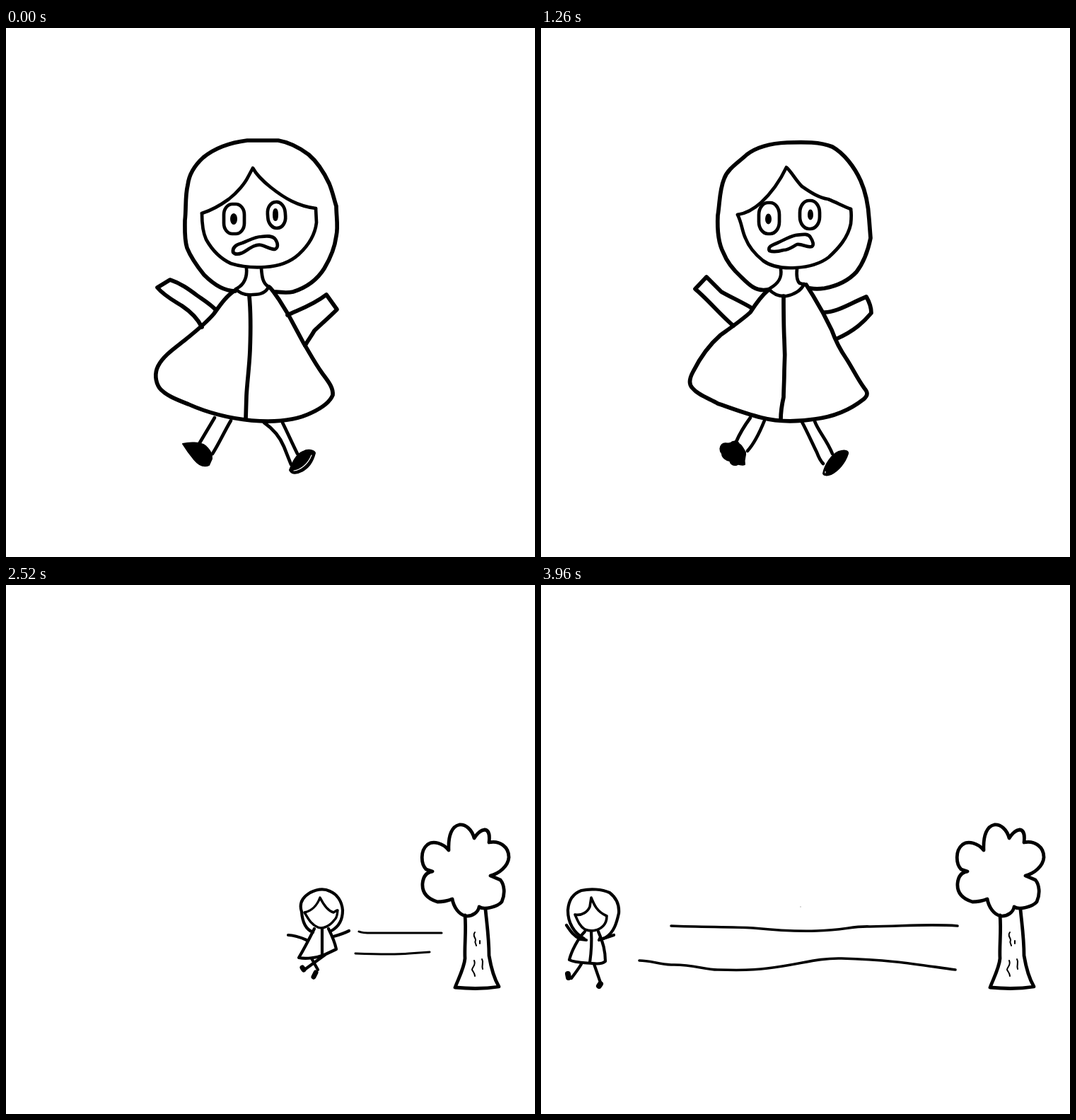
An HTML page without scripts for the animation above (4140 ms loop, 748 by 748 pixels).

```html
<!DOCTYPE html>
<html lang="en">
<head>
<meta charset="utf-8">
<title>Running from the tree</title>
<style>
  html, body { margin: 0; width: 100%; height: 100%; overflow: hidden; background: #fff; }
  svg { display: block; width: 100vw; height: 100vh; }
  svg { fill: none; stroke: #000; stroke-linecap: round; stroke-linejoin: round; }
  .big { stroke-width: 5.7; }
  .mid { stroke-width: 4.7; }
  .small { stroke-width: 4.2; }
  .trail { stroke-width: 3.6; }
  .thin { stroke-width: 2; }
  .ink { fill: #000; stroke-width: 2; }
  .shoe { stroke-width: 8; }
  .gap { stroke: #fff; stroke-width: 1.2; }

  /* 23 beats of 180 ms; --s is the beat on which a drawing appears */
  .on { opacity: 0; animation: one 4140ms step-end infinite; animation-delay: calc((var(--s) - 23) * 180ms); }
  .two { animation-name: two; }
  .three { animation-name: three; }
  .rest { animation-name: rest; }
  @keyframes one { 0% { opacity: 1 } 4.3478%, 100% { opacity: 0 } }
  @keyframes two { 0% { opacity: 1 } 8.6956%, 100% { opacity: 0 } }
  @keyframes three { 0% { opacity: 1 } 13.0434%, 100% { opacity: 0 } }
  @keyframes rest { 0% { opacity: 1 } 47.826%, 100% { opacity: 0 } }
</style>
</head>
<body>
<svg viewBox="0 0 748 748">
  <defs>
    <g id="headA">
      <path class="big" d="M324 372C308 372 292 361 280 349C272 339 262 326 256 311C252 298 253 285 253 272C255 255 253 238 257 222C259 205 268 193 279 183C295 170 317 162 341 159H385C403 162 416 170 428 179C442 191 450 205 457 220C462 232 464 243 467 252C467 266 470 281 467 294C465 310 459 325 450 340C440 356 425 367 406 373C398 375 390 374 380 373"/>
      <g class="mid">
        <path d="M277 262C290 258 304 250 315 242C328 232 338 219 342 211L349 198C355 209 364 217 374 225C394 241 413 252 438 255"/>
        <path d="M277 262C277 275 278 288 283 299C292 315 303 326 318 333C334 338 350 339 366 338C385 337 401 332 414 320C427 308 437 293 439 275L438 255"/>
        <rect x="308" y="249" width="29" height="42" rx="12" ry="15"/>
        <rect x="370" y="246" width="25" height="37" rx="12" ry="16" transform="rotate(-4 382 264)"/>
        <path d="M321 317C320 310 326 306 334 304C344 300 352 295 361 295C368 294 377 293 381 299C385 305 385 311 380 313C374 313 368 309 361 307C351 305 342 314 334 318C329 320 324 321 321 317Z"/>
      </g>
      <ellipse class="ink" cx="322" cy="270" rx="4" ry="7"/>
      <ellipse class="ink" cx="381" cy="264" rx="3" ry="8"/>
    </g>

    <g id="bodyA">
      <g class="mid">
        <path d="M340 339C341 350 339 361 327 368M361 340C362 352 363 360 370 365"/>
        <path d="M325 369C332 377 340 378 349 377C360 377 368 374 371 366"/>
        <path d="M295 551L273 588M318 555C308 572 301 588 292 602M365 558C378 567 388 580 393 592C397 602 400 610 403 617M391 558C398 572 404 586 412 602"/>
      </g>
      <g class="big">
        <path d="M324 371C312 378 302 393 294 404C284 416 267 430 252 442C238 453 222 464 215 478C210 488 211 500 217 509C225 519 240 525 258 532C285 544 317 552 347 555C382 558 412 554 432 544C445 538 458 529 462 519C463 508 455 499 447 488C435 471 428 457 421 446C414 433 405 416 399 405L386 384C381 377 376 369 372 366"/>
        <path d="M344 379C346 400 346 430 345 456C344 480 341 500 340 520L339 553"/>
        <path d="M297 399C290 391 280 385 270 378C258 369 247 361 232 356L214 367C224 379 238 386 249 393C261 401 271 411 277 423"/>
        <path d="M398 406C412 399 434 392 453 377L468 398C455 411 444 420 436 428C431 437 427 441 423 449"/>
      </g>
      <path class="ink" d="M250 588C258 586 275 585 282 591C288 597 292 602 291 609L287 618C278 622 271 616 266 610C260 603 255 596 250 588Z"/>
      <path class="ink" d="M401 625C405 615 410 603 420 599C427 595 436 597 437 601C434 613 428 622 418 627C411 631 403 631 401 625Z"/>
      <path class="gap" d="M407 626C416 625 427 617 432 604"/>
    </g>

    <g id="headB">
      <path class="big" d="M320 370C304 373 294 363 283 352C271 341 263 331 258 318C250 303 249 285 250 265C253 247 252 230 259 213C264 199 278 191 291 179C304 169 325 163 348 162C372 161 395 161 412 168C428 177 443 196 452 216C460 234 463 253 464 271L466 297C462 317 456 332 446 345C433 359 417 365 401 368C394 369 386 369 381 368"/>
      <g class="mid">
        <path d="M278 264C291 262 301 256 311 247C325 234 337 218 347 197C354 203 360 215 369 224C382 233 393 240 406 242C418 247 428 252 438 256"/>
        <path d="M278 264C284 276 284 286 289 297C294 310 304 321 314 329C326 338 343 340 360 339C378 338 394 334 407 324C420 312 434 297 438 277C439 268 439 262 438 256"/>
        <rect x="308" y="247" width="29" height="44" rx="13" ry="17"/>
        <rect x="366" y="244" width="28" height="40" rx="13" ry="17"/>
        <path d="M323 315C320 309 327 307 334 304C343 300 351 295 360 293C369 292 378 290 381 296C385 302 386 307 383 309C376 311 370 305 362 306C356 309 350 314 343 314C336 316 328 317 323 315Z"/>
      </g>
      <ellipse class="ink" cx="321.5" cy="270" rx="3.5" ry="6.5"/>
      <ellipse class="ink" cx="381" cy="264" rx="3" ry="6.5"/>
    </g>

    <g id="bodyB">
      <g class="mid">
        <path d="M339 341C341 353 336 361 324 368M362 340C361 350 362 358 366 361L374 363"/>
        <path d="M322 369C329 377 337 380 347 379C358 377 368 371 372 362"/>
        <path d="M296 551C288 562 282 571 276 585M316 555C310 570 301 588 292 598M369 557C377 572 384 588 390 600C393 608 396 613 399 616M387 556C392 570 404 582 412 602"/>
      </g>
      <g class="big">
        <path d="M322 370C311 379 303 391 296 402C284 413 268 424 254 434C238 448 224 468 215 486C209 497 209 504 214 509C222 519 238 524 250 531C270 538 291 546 312 551C335 557 361 557 387 553C412 550 437 540 456 525C463 519 462 515 457 509C448 497 441 482 432 468C423 455 416 441 411 427C403 410 393 392 385 379L375 363"/>
        <path d="M343 379C343 400 343 420 344 440C345 455 345 470 344 485C344 500 343 512 343 522C340 535 339 546 339 554"/>
        <path d="M298 396C283 387 267 380 255 373L234 352L218 369C235 383 255 407 272 421"/>
        <path d="M401 402C418 402 436 390 460 380C464 387 467 396 467 403C457 415 444 428 417 440"/>
      </g>
      <path class="ink" d="M256 589C260 585 264 589 268 587C272 583 278 584 280 588C285 591 286 596 289 600C290 606 286 609 288 617C284 619 280 616 278 617C272 620 268 616 267 612C262 612 256 607 256 602C252 597 253 592 256 589Z"/>
      <path class="ink" d="M399 630C401 618 411 603 421 599C430 596 435 598 434 602C430 615 420 626 410 631C405 633 400 633 399 630Z"/>
      <path class="gap" d="M402 627V629"/>
    </g>

    <g id="a"><use href="#headA"/><use href="#bodyA"/></g>
    <g id="b"><use href="#headB"/><use href="#bodyB"/></g>
    <g id="c"><use href="#headB" x="2" y="-4"/><use href="#bodyA" x="-3" y="-1"/></g>

    <g id="skip">
      <path d="M183 499C171 490 162 475 162 460C161 445 170 431 186 427C198 425 213 425 225 429C234 435 240 449 240 463C239 477 233 488 222 492C218 494 214 494 210 493"/>
      <path d="M178 460C188 464 196 461 203 456C211 462 220 463 228 459M178 460C177 470 183 483 190 490C199 494 206 493 214 490C223 484 229 474 228 459"/>
      <path d="M186 493C183 506 175 519 170 531C170 537 180 536 190 536C203 537 214 536 223 534C222 522 219 508 213 494M200 493C197 507 198 521 197 536"/>
      <path d="M157 493C165 499 172 503 181 506M220 510C225 506 230 505 236 504M187 537C195 543 200 548 205 553M206 537L192 552"/>
      <path d="M187 546L191 557" stroke-width="5"/>
      <path class="shoe" d="M204 555L205 561"/>
    </g>
  </defs>

  <!-- close-up -->
  <use href="#a" class="on" style="--s:0"/>
  <use href="#c" class="on" style="--s:1"/>
  <use href="#a" class="on" style="--s:2"/>
  <use href="#c" class="on" style="--s:3"/>
  <use href="#a" class="on" style="--s:4"/>
  <use href="#b" class="on" style="--s:5"/>
  <use href="#c" class="on" style="--s:6"/>
  <use href="#b" class="on" style="--s:7"/>
  <use href="#c" class="on" style="--s:8"/>
  <use href="#b" class="on" style="--s:9"/>
  <use href="#a" class="on" style="--s:10"/>
  <use href="#b" class="on" style="--s:11"/>

  <!-- tree -->
  <g class="on rest" style="--s:12">
    <path stroke-width="4.8" d="M626 375C618 365 604 361 596 367C585 376 587 395 594 402L603 405C595 406 590 412 589 422C588 436 597 444 610 448C618 448 626 446 631 444C633 455 640 466 650 468C660 469 668 462 669 455C676 460 695 455 701 448C706 437 705 424 699 417L685 411C697 408 710 398 711 385C711 370 698 361 683 364C684 355 684 347 677 346C670 347 665 353 662 358C659 346 650 338 641 339C631 341 625 353 626 375Z"/>
    <path stroke-width="4.8" d="M649 467C651 490 648 510 649 528C648 541 640 556 635 569C655 571 678 571 697 568C690 556 686 542 683 524C683 500 680 480 678 459"/>
    <path class="thin" d="M663 491C659 496 664 498 664 502C662 506 665 508 665 510M670 503V507M662 531C665 538 659 540 659 544C661 548 663 549 663 553M673 529C676 534 672 537 674 543"/>
  </g>

  <!-- girl running left -->
  <g class="small">
    <g class="on two" style="--s:14">
      <path d="M434 491C424 487 419 476 418 462C414 450 420 441 430 435C440 430 450 429 458 433C468 437 475 447 476 460C476 472 471 483 460 489"/>
      <path stroke-width="3.4" d="M422 463C432 461 440 453 444 442C449 452 455 461 463 463L468 460M422 463C427 471 431 480 441 484C448 487 458 482 464 474C469 470 468 465 469 460"/>
      <path d="M436 486C430 498 423 512 414 527C425 529 440 527 450 523L467 515C465 505 461 496 456 486M447 486V523"/>
      <path d="M399 495C409 495 418 499 425 502M463 497C470 495 477 493 485 489M432 528L441 544M451 523L422 544"/>
      <path stroke-width="7" d="M419 541L421 544M438 548L435 554"/>
    </g>
    <g class="on two" style="--s:16"><use href="#skip" x="127"/></g>
    <g class="on two" style="--s:18"><use href="#skip"/></g>
    <g class="on three" style="--s:20">
      <path d="M61 500C46 492 38 477 38 460C39 445 46 436 57 432C70 429 86 430 97 435C106 442 111 451 110 464C107 478 103 491 92 498C89 500 86 501 83 500"/>
      <path stroke-width="3.6" d="M48 466C58 468 66 462 69 455L71 442C75 452 79 462 93 468M48 466C52 475 55 483 62 487C72 491 82 488 88 482C92 478 93 473 93 468"/>
      <path d="M62 490C52 500 43 518 40 530C47 534 60 534 72 535C80 536 87 536 91 532C91 520 88 505 81 490M71 490C72 505 71 520 69 534"/>
      <path d="M36 481C42 490 46 496 56 501L64 502M82 502L103 495M57 536C53 543 48 549 43 556M75 536L84 562"/>
      <path class="shoe" d="M38 550L39 555M84 564L82 567"/>
      <circle cx="367" cy="455" r="1" fill="#ccc" stroke="none"/>
    </g>
  </g>

  <!-- speed lines -->
  <g class="trail">
    <path class="on" style="--s:14" stroke-width="3" d="M499 490C505 493 515 492 530 492H616M494 521C520 522 550 523 570 521L599 519"/>
    <path class="on" style="--s:15" stroke-width="3" d="M490 493C520 492 560 497 612 494M497 524C530 531 560 531 604 528"/>
    <path class="on" style="--s:16" d="M398 492C440 499 500 491 608 489M381 527C430 532 500 527 597 525"/>
    <path class="on" style="--s:17" d="M392 495C450 489 520 497 610 491M385 534C440 545 520 541 598 532"/>
    <path class="on" style="--s:18" d="M306 492C322 490 345 497 365 500C378 502 395 500 430 499C470 495 500 490 530 488L609 485M277 533C315 533 345 528 370 529C385 532 430 531 470 531C505 526 540 521 591 520"/>
    <path class="on" style="--s:19" d="M285 490C340 486 420 497 480 492C530 488 570 487 609 489M259 533C330 541 400 538 460 541C510 540 550 530 592 530"/>
    <path class="on" style="--s:20" d="M178 484C240 491 330 480 420 489C480 491 530 484 592 483M146 538C220 552 280 551 350 546C430 540 500 553 584 551"/>
    <path class="on" style="--s:21" d="M186 475C250 484 330 469 410 470C480 471 540 479 592 478M150 536C230 546 290 541 350 538C430 531 500 541 580 543"/>
    <path class="on" style="--s:22" d="M184 482C230 484 270 483 300 485C330 488 360 490 390 489C430 488 440 482 465 483C520 482 550 479 589 482M139 531C155 531 165 536 184 537C215 536 230 544 250 544C280 545 300 545 320 542C365 537 390 527 425 528C500 530 540 538 586 544"/>
  </g>
</svg>
</body>
</html>
```
